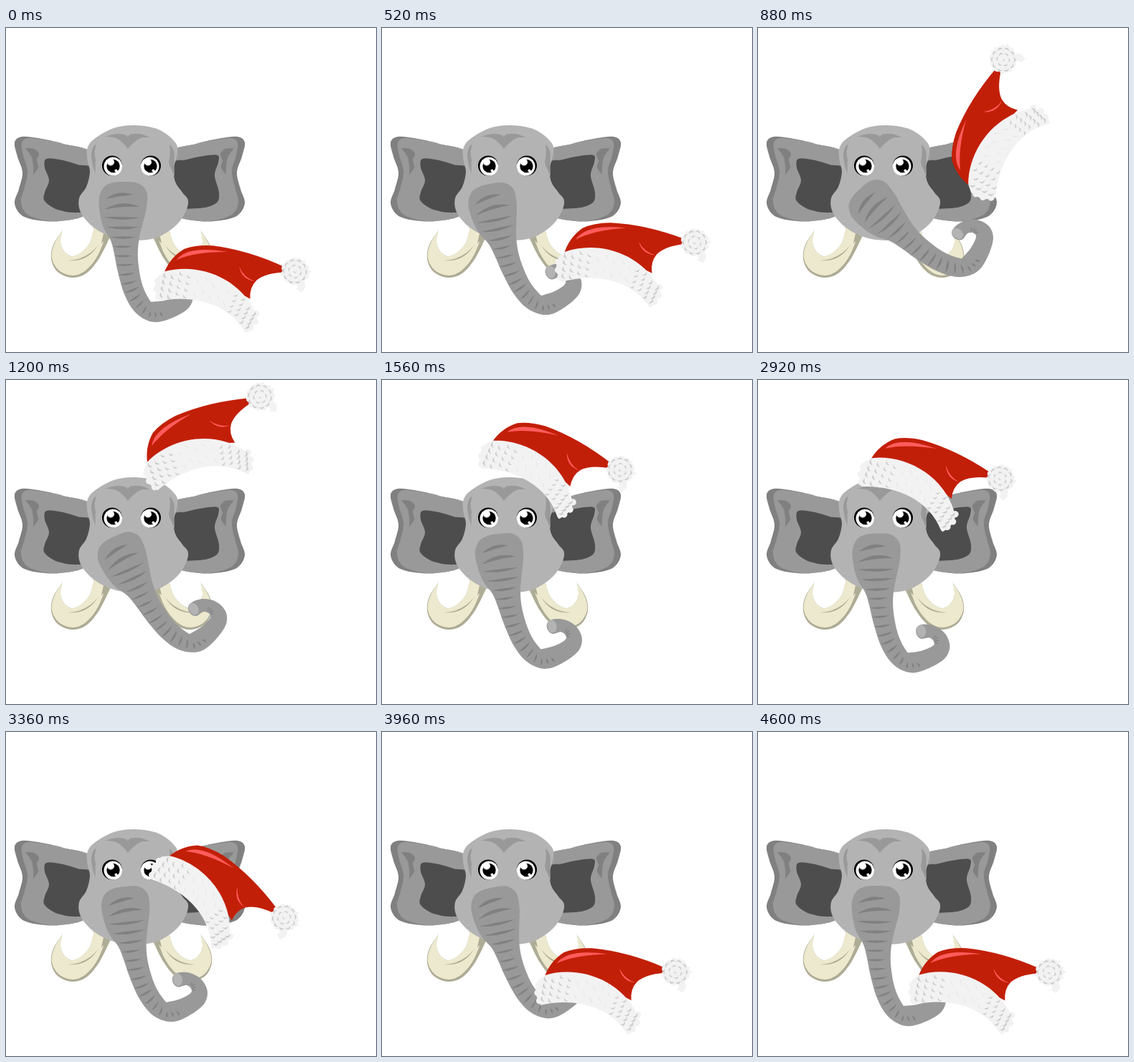
Write an HTML page with a canvas that moves like this. It is 516 px wide and 453 px high and loops after 6720 ms.

```html
<!DOCTYPE html>
<html lang="en">
<head>
<meta charset="utf-8">
<title>Elephant with a winter hat</title>
<style>
html, body { margin: 0; width: 100%; height: 100%; overflow: hidden; background: #fff; }
canvas { display: block; }
</style>
</head>
<body>
<canvas id="stage" width="516" height="453"></canvas>
<script>
const ctx = document.getElementById('stage').getContext('2d');
const LOOP = 6720, STEP = 40, LAST = 115;
const GREY = '#999', DARK = '#808080', FUR = '#f2f2f2', FUR_SHADE = '#ccc';

// Keys: frame, x, y, degrees
const hatKeys = [
  [0, 305.5, 351.5, 3.5], [6, 311, 361, 10], [12, 338, 328, 2],
  [17, 343, 262, -17], [19.3, 370, 205, -38], [22, 326.6, 141, -71],
  [28, 290, 90, -40], [34, 248, 80, 0], [39, 234.6, 114.5, 16.5],
  [49, 207, 117, -0.5], [60, 206.5, 116, 0], [68, 218, 121, 5],
  [76, 255, 145, 18], [80, 276, 174, 26], [84, 297, 223, 32],
  [86, 304, 268, 28], [90, 311, 370, 12], [99, 312, 349, 2],
  [115, 309, 349, 2.4]
];
const trunkKeys = [
  [0, -1, 1, 0], [7, -6, 2, 4], [17, -8, 4, -26], [22, 1, 2, -43],
  [28, 1, 2, -31], [34, 0, 1, -13], [39, 0.5, 1, -8], [49, 0, 0, 0],
  [60, 0, 0, 0], [70, 0.5, 0.5, -1], [84, 3.5, 2, -7.5],
  [91, 0, 2.5, -14], [99, -4.5, 3, -12.5], [115, 0, 1, 0]
];

// Smooth curve through the keys, at rest at both ends
function pose(keys, f) {
  let i = 0;
  while (i < keys.length - 2 && f >= keys[i + 1][0]) i++;
  const a = keys[i], b = keys[i + 1], h = b[0] - a[0], u = (f - a[0]) / h;
  const slope = (j, c) => {
    const p = keys[j - 1], n = keys[j + 1];
    return p && n ? (n[c] - p[c]) / (n[0] - p[0]) : 0;
  };
  const v = u * u * (3 - 2 * u);
  return [1, 2, 3].map(c => a[c] + (b[c] - a[c]) * v +
    h * u * (1 - u) * ((1 - u) * slope(i, c) - u * slope(i + 1, c)));
}

// Closed smooth outline; a repeated point makes a corner
function blob(color, p) {
  const n = p.length / 2, x = i => p[(i + n) % n * 2], y = i => p[(i + n) % n * 2 + 1];
  ctx.fillStyle = color;
  ctx.beginPath();
  ctx.moveTo(x(0), y(0));
  for (let i = 0; i < n; i++) {
    ctx.bezierCurveTo(
      x(i) + (x(i + 1) - x(i - 1)) / 6, y(i) + (y(i + 1) - y(i - 1)) / 6,
      x(i + 1) - (x(i + 2) - x(i)) / 6, y(i + 1) - (y(i + 2) - y(i)) / 6,
      x(i + 1), y(i + 1));
  }
  ctx.fill();
}

function shape(color, d) {
  ctx.fillStyle = color;
  ctx.fill(new Path2D(d));
}

function dot(color, x, y, rx, ry = rx, turn = 0) {
  ctx.fillStyle = color;
  ctx.beginPath();
  ctx.ellipse(x, y, rx, ry, turn, 0, Math.PI * 2);
  ctx.fill();
}

// Sliver between two points, bent by b on one side and c on the other
function sliver(color, x1, y1, x2, y2, b, c) {
  const dx = x2 - x1, dy = y2 - y1, l = Math.hypot(dx, dy);
  const mx = (x1 + x2) / 2, my = (y1 + y2) / 2, nx = dy / l, ny = -dx / l;
  ctx.fillStyle = color;
  ctx.beginPath();
  ctx.moveTo(x1, y1);
  ctx.quadraticCurveTo(mx + nx * b, my + ny * b, x2, y2);
  ctx.quadraticCurveTo(mx + nx * c, my + ny * c, x1, y1);
  ctx.fill();
}

// Small curl of fur, bulging towards angle a
function curl(x, y, s, a, color = FUR_SHADE) {
  const px = -Math.sin(a) * s, py = Math.cos(a) * s;
  sliver(color, x - px, y - py, x + px, y + py, s * 1.7, s * 0.6);
}

function mirrored(sum, draw) {
  draw();
  ctx.save();
  ctx.translate(sum, 0);
  ctx.scale(-1, 1);
  draw();
  ctx.restore();
}

function ear() {
  blob(DARK, [122,178, 80,162, 45,154, 22,152, 12,160, 16,180, 23,202, 18,225, 12,245, 22,262, 45,269, 75,270, 110,262, 122,240]);
  blob(GREY, [122,178, 80,162, 50,156, 30,154, 22,161, 24,178, 30,200, 26,222, 21,242, 27,258, 45,267, 75,270, 110,262, 122,240]);
  blob(DARK, [27,168, 27,168, 39,169, 46,176, 43,185, 45,195, 38,205, 38,205, 38,192, 35,179]);
}

function tusk() {
  blob('#aeac96', [78,284, 78,284, 66,303, 63,323, 72,341, 92,349, 112,343, 130,322, 147,288, 147,288, 123,280, 123,280, 117,300, 105,314, 92,319, 81,312, 76,300]);
  blob('#ece9ce', [78,284, 78,284, 67,303, 64,322, 74,339, 93,346, 111,339, 128,318, 140,288, 140,288, 123,280, 123,280, 117,300, 105,314, 92,319, 81,312, 76,300]);
  sliver('#aeac96', 86, 325, 128, 304, -15, -11);
  shape('#aeac96', 'M136 287L133 301Q140 296 143 287Z');
}

function eye(x, side) {
  dot('#000', x + side, 192.5, 14, 14);
  dot('#fff', x - side * 0.3, 193.5, 12.8, 13);
  dot('#000', x + 0.5, 193, 9.2);
  dot('#fff', x - 3, 187.5, 5);
  dot('#fff', x + 4.5, 199.5, 2);
}

function head() {
  blob('#b3b3b3', [180,136, 150,140, 122,156, 113,170, 114,187, 117,202, 112,222, 102,238, 104,257, 120,277, 147,292, 178,297, 210,293, 236,277, 250,258, 254,241, 246,230, 236,215, 234,196, 239,176, 236,160, 213,142]);
  shape(GREY, 'M139 152Q153 146 165 149Q169 150 170 152Q172 148 178 148Q191 147 200 153Q187 152 181 158Q174 163 170 169Q166 163 160 158Q153 151 139 152Z');
  shape(GREY, 'M126 162Q119 166 119 178Q120 193 125 204Q124 193 125 185Q122 172 126 162Z');
  shape(GREY, 'M228 163Q234 167 235 178Q234 193 235 207Q229 195 227 188Q230 174 228 163Z');
  eye(149, -1);
  eye(201, 1);
}

function trunk([dx, dy, deg]) {
  ctx.save();
  ctx.translate(165 + dx, 250 + dy);
  ctx.rotate(deg * Math.PI / 180);
  ctx.translate(-165, -250);
  blob(GREY, [165,214, 185,216, 197,228, 197,250, 191,275, 186,298, 185,322, 189,350, 195,368, 203,382, 203,382, 222,380, 238,374, 240,368, 234,362, 222,363, 216,356, 217,347, 226,343, 242,346, 256,357, 262,374, 256,390, 238,402, 214,410, 196,407, 179,394, 166,371, 157,340, 152,315, 147,296, 137,278, 132,258, 131,236, 138,221, 150,215]);
  dot('#b3b3b3', 223, 352.5, 6.5, 9, -0.1);
  [
    [140, 238, 178, 232, 11, 1], [138, 253, 187, 249, 13, 3],
    [137, 263, 188, 264, 1, -7], [141, 277, 187, 277, 1, -7],
    [147, 291, 182, 291, 1, -6], [150, 304, 177, 304, 1, -5],
    [152, 317, 177, 317, 1, -5], [154, 330, 179, 329, 1, -5],
    [157, 344, 181, 341, 1, -5], [161, 357, 183, 352, 1, -5],
    [166, 369, 186, 361, 1, -5], [173, 381, 189, 370, 1, -5],
    [181, 391, 193, 379, 1, -4], [190, 399, 197, 387, 1, -4],
    [200, 404, 202, 395, 1, -4], [210, 404, 208, 396, 1, -4],
    [219, 403, 215, 396, 1, -4]
  ].forEach(w => sliver(DARK, ...w));
  for (let i = 0; i < 4; i++) {
    const a = -1.1 + i * 0.6;
    sliver(DARK, 239 + 2 * Math.cos(a), 366 + 2 * Math.sin(a),
      239 + 9 * Math.cos(a), 366 + 9 * Math.sin(a), 2, -1);
  }
  ctx.restore();
}

const bez = (u, a, b, c, d) => {
  const w = 1 - u;
  return w * w * w * a + 3 * w * w * u * b + 3 * w * u * u * c + u * u * u * d;
};

// Point on the fur band: u along it, v from top to bottom edge
function band(u, v) {
  const x = bez(u, 122, 165, 225, 252), y = bez(u, 110, 95, 110, 160);
  return [x + (bez(u, 117, 160, 212, 240) - x) * v, y + (bez(u, 152, 140, 148, 187) - y) * v];
}

function fur() {
  shape(FUR, 'M122 110C165 95 225 110 252 160Q258 173 241 189L238 187C212 148 160 140 117 152Q105 136 113 117Z');
  [[113, 124], [112, 135], [115, 146], [253, 161], [252, 172], [246, 181]]
    .forEach(([x, y]) => dot(FUR, x, y, 4.5));
  for (let col = 0; col < 13; col++) {
    for (let row = 0; row < 4; row++) {
      const u = 0.02 + col * 0.08, edge = Math.abs(u - 0.5) * 2;
      const [x, y] = band(u, 0.15 + row * 0.22 + (col % 2) * 0.09);
      const a = 2.8 - 2.1 * u;
      if (edge > 0.35) curl(x, y, 2.6 + edge * 2, a);
      else if ((row + col) % 2) sliver('#ddd', x - 2, y - 5, x + 3, y + 5, 1.5, 0);
    }
  }
}

function pompom() {
  for (let i = 0; i < 11; i++) {
    const a = i * Math.PI * 2 / 11;
    dot(FUR, 303 + 14 * Math.cos(a), 99 + 14 * Math.sin(a), 5.5);
  }
  dot(FUR, 303, 99, 16);
  shape(FUR, 'M314 89L323 91L322 96L327 97L322 102L323 107L314 110Z');
  shape(FUR, 'M305 113L309 121L306 123L314 128L319 120L316 109Z');
  shape(FUR, 'M297 84L301 79L304 82L309 79L310 84L317 82L316 90Z');
  for (let i = 0; i < 10; i++) {
    const a = i * Math.PI / 5;
    curl(303 + 14 * Math.cos(a), 99 + 14 * Math.sin(a), 4, a);
  }
  for (let i = 0; i < 6; i++) {
    const a = i * Math.PI / 3 + 0.3;
    curl(303 + 7 * Math.cos(a), 99 + 7 * Math.sin(a), 3.4, a);
  }
  curl(303, 99, 2.5, 2);
}

function hat([x, y, deg]) {
  ctx.save();
  ctx.translate(x, y);
  ctx.rotate(deg * Math.PI / 180);
  ctx.translate(-206.5, -116);
  shape('#c21f08', 'M121 112Q128 90 147 77Q163 70 186 70Q236 73 289 94L288 101Q261 104 250 115Q241 125 243 141Q200 118 121 112Z');
  shape('#ff5c5c', 'M137 93Q152 71 207 77.5Q163 80 137 93Z');
  shape('#ff5c5c', 'M225 97Q233 112 248 116Q230 115 225 97Z');
  fur();
  pompom();
  ctx.restore();
}

function draw(f) {
  ctx.fillStyle = '#fff';
  ctx.fillRect(0, 0, 516, 453);
  mirrored(345, ear);
  blob('#4d4d4d', [56,183, 75,184, 100,191, 122,199, 122,250, 100,258, 72,254, 54,242, 54,230, 60,213, 54,195]);
  blob('#4d4d4d', [230,192, 252,184, 275,179, 295,178, 296,188, 291,206, 297,230, 293,245, 268,252, 230,246]);
  mirrored(350, tusk);
  head();
  trunk(pose(trunkKeys, f));
  hat(pose(hatKeys, f));
}

const start = performance.now();
function tick() {
  const t = (performance.now() - start) % LOOP;
  draw(Math.min(LAST, Math.floor(t / STEP)));
  requestAnimationFrame(tick);
}
tick();
</script>
</body>
</html>
```
